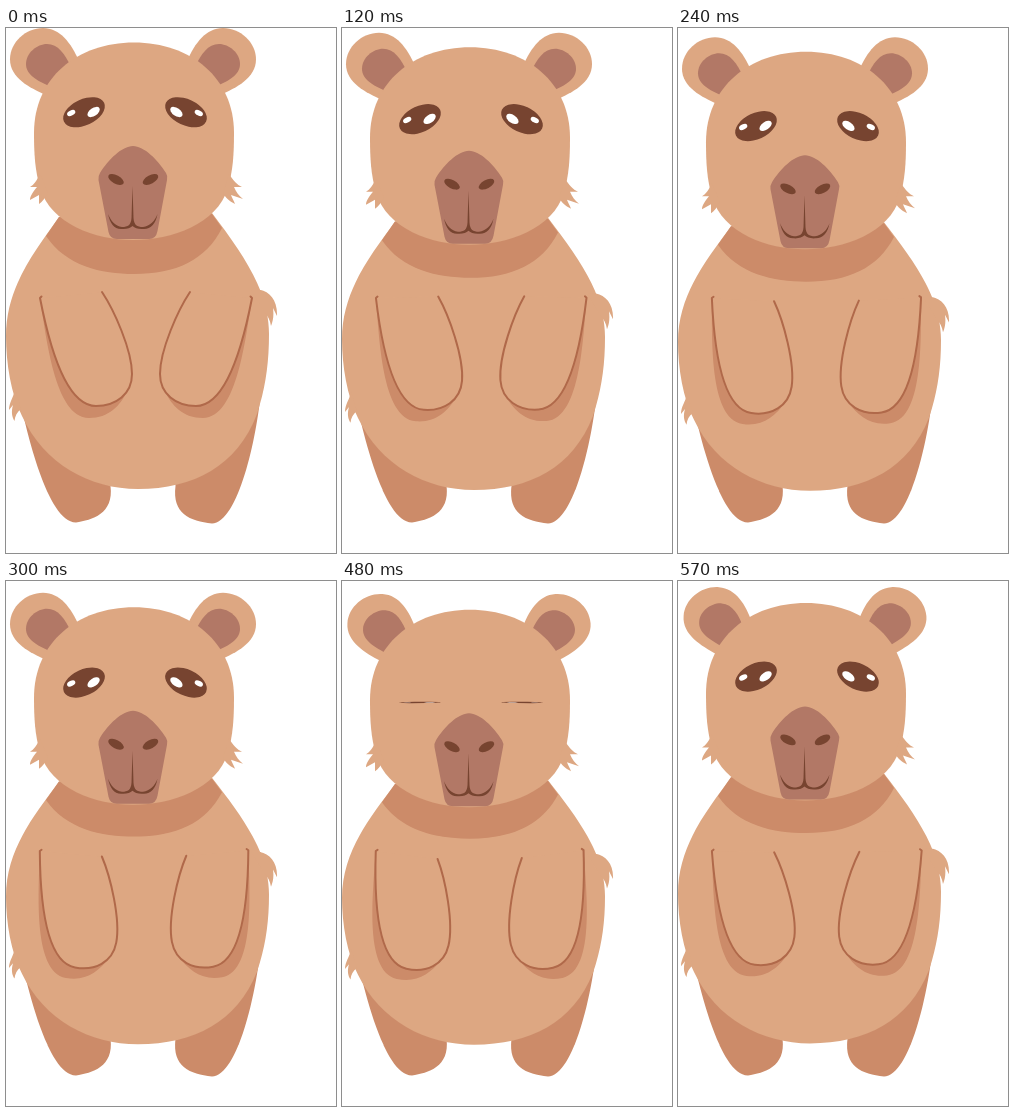
Recreate the animation shown at these times as an HTML page. Size 330 by 525 pixels, loop 0.6 s.

```html
<!DOCTYPE html>
<html lang="en">
<head>
<meta charset="utf-8">
<title>Capybara</title>
<style>
  html, body { margin: 0; width: 100%; height: 100%; overflow: hidden; background: #fff; }
  svg { display: block; width: 330px; height: 525px; }
  .fur { fill: #dda782; }
  .shade { fill: #cc8b69; }
  .muzzle { fill: #b27866; }
  .dark { fill: #774430; }
  .white { fill: #fff; }
  .line { fill: none; stroke: #b0694a; stroke-width: 2; stroke-linecap: round; stroke-linejoin: round; }
</style>
</head>
<body>
<svg viewBox="0 0 330 525">
  <defs>
    <g id="ear">
      <path class="fur" d="M40 67C24 60 4 50 4 31.500C4 14 20 0 37 0C54 0 65 15 73 33L60 62Z"/>
      <path class="muzzle" d="M43 58C32 53 20 47 20 36C20 25 31 16 41 16C52 16 59 26 65 39Z"/>
    </g>
    <g id="eye">
      <ellipse class="dark" rx="22.2" ry="13" transform="rotate(-25)"/>
      <ellipse class="white" rx="4.4" ry="2.6" transform="translate(-12.8 .8) rotate(-27)"/>
      <ellipse class="white" rx="7" ry="3.9" transform="translate(9.6 -.2) rotate(-35)"/>
    </g>
    <g id="arm">
      <path class="shade" d="M34 271C40 305 48 390 83 390C103 390 114 378 122 362L90 340Z"/>
      <path class="fur" d="M34 270C41 306 57 378 90 378C110 378 126 366 126 346C126 322 108 282 96 264Z"/>
      <path class="line" d="M35.500 268.500L34 270C41 306 57 378 90 378C110 378 126 366 126 346C126 322 108 282 96 264"/>
    </g>
  </defs>

  <path class="shade" d="M14 372C20 400 41 494 70 494.500C86 492 108 486 104.500 458L105 440L60 390Z"/>
  <path class="shade" d="M255 362C251 410 232 495 206 495.500C184 493 166 486 169.500 458L169 440L215 390Z"/>

  <g id="torso">
    <path class="fur" d="M53 189C30 222 0 258 0 308C0 335 5 366 16 388C38 436 84 461 132 461C188 461 231 438 251 386C259 361 263 337 263 306C263 262 236 225 206 185Z"/>
    <path class="fur" d="M245 262C258 259 272 268 271 288L267 280C268 288 267 293 265 298C264 292 262 288 258 284Z"/>
    <path class="fur" d="M9 361C8 369 3 374 3 382L7 377C5 384 6 389 8.500 393C9 388 11 384 15 381Z"/>
    <path class="shade" d="M53 189L40 208C60 238 95 246 128 246C170 246 200 232 216 200L206 186Z"/>
  </g>

  <use href="#arm" id="armL"/>
  <g transform="matrix(-1 0 0 1 280 0)"><use href="#arm" id="armR"/></g>

  <g id="head">
    <use href="#ear" id="earL"/>
    <g transform="matrix(-1 0 0 1 254 0)"><use href="#ear" id="earR"/></g>
    <path class="fur" d="M128 14.500C185 14.500 228 50 228 105C228 126 227 142 222 160C211 196 166 212 127 212C89 212 45 196 34 160C29 142 28 126 28 105C28 50 71 14.500 128 14.500Z"/>
    <path class="fur" d="M223 146C227 152 231 157 236 159L228 159C230 164 233 168 237 171L225 167C226 170 228 173 229 176C223 173 220 170 217 165Z"/>
    <path class="fur" d="M34 146C31 152 28 157 24 159L31 159C27 164 24 168 24 172L33 167C33 170 33 173 33 176C36 174 39 170 42 165Z"/>
    <path class="muzzle" d="M127 118C138 118 152 132 160 145Q162 148 161 152L151.500 203Q150 211 143 211L111 211Q104 211 102.500 204L92.500 152Q92 148 94 145C102 132 116 118 127 118Z"/>
    <ellipse class="dark" rx="8.500" ry="4.200" transform="translate(110 151.500) rotate(28)"/>
    <ellipse class="dark" rx="8.500" ry="4.200" transform="translate(144.500 151.500) rotate(-28)"/>
    <path class="dark" d="M126.500 158L127.500 190C128 197 131 199 137 199C144 198 149 193 151.500 186C150 195 145 201 138 201C132 201.500 129 200 126.500 198C124 200 121 201.500 115 201C108 201 104 195 102 186C105 193 109 198 116 199C122 199 125 197 125.500 190Z"/>
    <use href="#eye" id="eyeL"/>
    <use href="#eye" id="eyeR"/>
  </g>
</svg>
<script>
  const LOOP = 600, STEP = 30;

  // [ms, value] pairs
  const sink = [[0, 0], [390, 15.2], [420, 16.1], [450, 16.3], [480, 14.2], [570, 7.4], [600, 0]];
  const eyeDrop = [[0, 0], [300, 5.7], [390, 4.2], [480, 23], [570, 4], [600, 0]];
  const eyeOpen = [[0, 1], [390, 1], [480, 0.05], [570, 1], [600, 1]];
  const earTilt = [[0, 0], [390, 0], [480, 4], [570, 4.5], [600, 0]];

  const el = id => document.getElementById(id);
  const set = (id, value) => el(id).setAttribute('transform', value);

  function at(keys, t) {
    const i = keys.findIndex(k => k[0] > t);
    const [t0, a] = keys[i - 1], [t1, b] = keys[i];
    return a + (b - a) * (t - t0) / (t1 - t0);
  }

  function pose(t) {
    const y = at(sink, t), k = y / 15.2;
    set('head', `translate(0 ${y})`);
    set('torso', `translate(0 528) scale(1 ${1 - 0.0442 * k}) translate(0 -528)`);

    const swing = `rotate(${13.8 * k} 34 269)`;
    set('armL', swing);
    set('armR', `translate(${5 * k} ${-k}) ${swing}`);

    const tilt = `rotate(${at(earTilt, t)} 55 50)`;
    set('earL', tilt);
    set('earR', tilt);

    const eyeY = 84.2 + at(eyeDrop, t), open = at(eyeOpen, t);
    set('eyeL', `translate(78 ${eyeY}) scale(1 ${open})`);
    set('eyeR', `translate(180 ${eyeY}) scale(-1 ${open})`);
  }

  const start = performance.now();
  function tick() {
    const t = (performance.now() - start) % LOOP;
    pose(Math.floor(t / STEP) * STEP);
    requestAnimationFrame(tick);
  }
  pose(0);
  requestAnimationFrame(tick);
</script>
</body>
</html>
```
